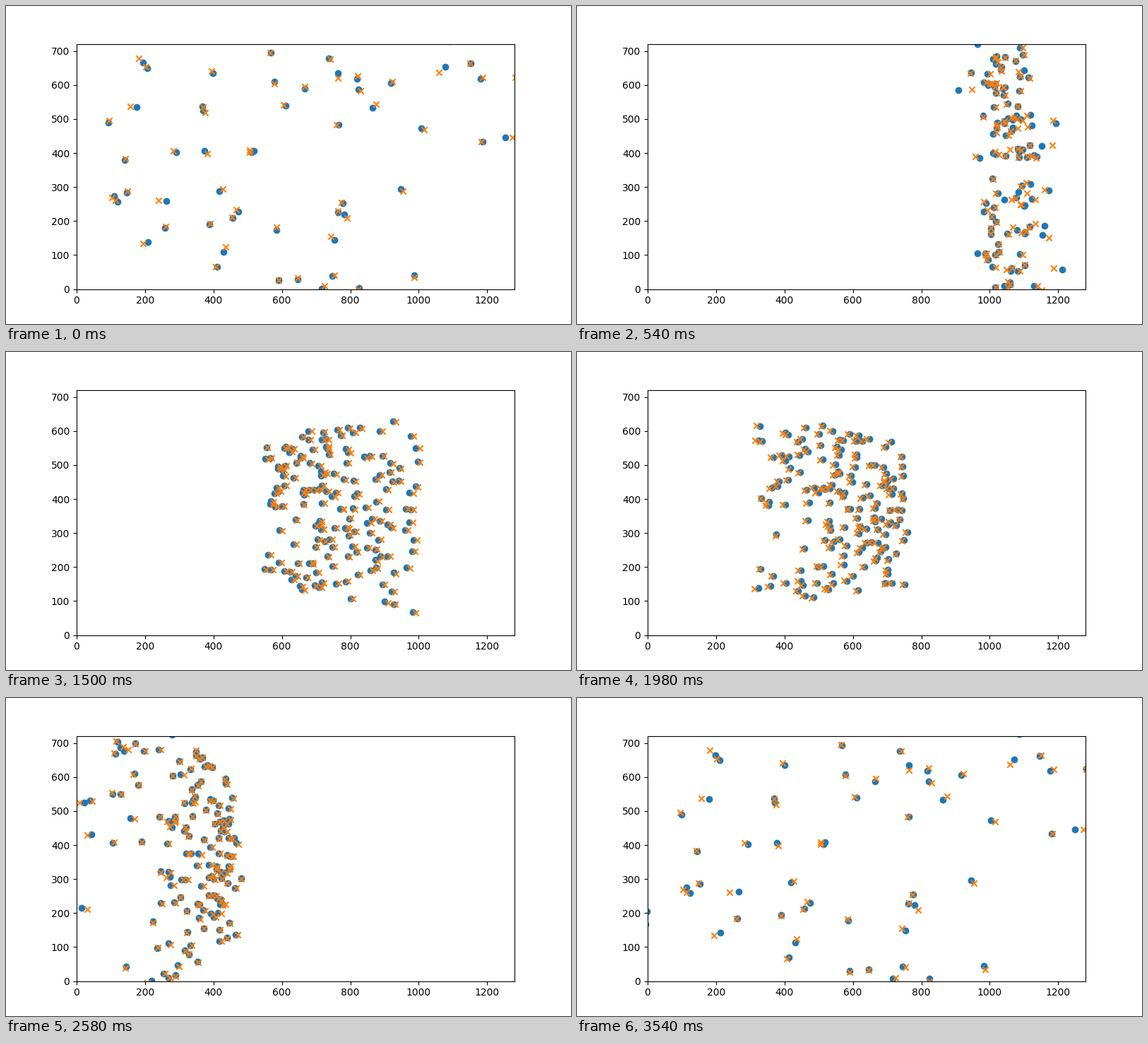
Recreate the animation shown at these times as a matplotlib script. Size 800 by 450 pixels, loop 3600 ms.

```python
import numpy as np
import matplotlib.pyplot as plt
from matplotlib.animation import FuncAnimation

W, H = 1280, 720            # camera image size
FOCAL = 583
FRAMES = 60
COUNT = 160
# Thin wall of landmarks, in units of the camera's orbit radius
LOW = (-0.585, -0.65, 0.515)
HIGH = (0.585, 0.65, 0.65)
NOISE = (0.0045, 0.0025, 0.008)

rng = np.random.default_rng(7)
truth = rng.uniform(LOW, HIGH, (COUNT, 3))
estimate = truth + rng.normal(0, NOISE, (COUNT, 3))


def project(pts, angle, back=0.0):
    """Pinhole view from a unit orbit, looking at its centre."""
    x, y, z = pts.T
    s, c = np.sin(angle), np.cos(angle)
    depth = 1 + back - z * c + x * s
    depth = np.where(depth > 0.03, depth, np.nan)
    u = W / 2 + FOCAL * (x * c + z * s) / depth
    v = H / 2 + FOCAL * y / depth
    return np.column_stack([u, v])


fig, ax = plt.subplots(figsize=(8, 4.5), dpi=100)
ax.set_xlim(0, W)
ax.set_ylim(0, H)
dots = ax.scatter([], [], color="C0")
crosses = ax.scatter([], [], color="C1", marker="x")


def update(k):
    t = k / (FRAMES - 1)
    angle = 2 * np.pi * t
    # the estimated pose drifts slowly and wobbles on the far side
    wobble = -7 * np.sin(3 * angle) * np.sin(angle / 2) ** 2
    crosses.set_offsets(project(truth, angle))
    dots.set_offsets(project(estimate, angle, 0.004 * t) + (wobble, 1.5 * t))
    return dots, crosses


anim = FuncAnimation(fig, update, frames=FRAMES, interval=60, repeat=True,
                     repeat_delay=0, blit=False)
plt.show()
```
